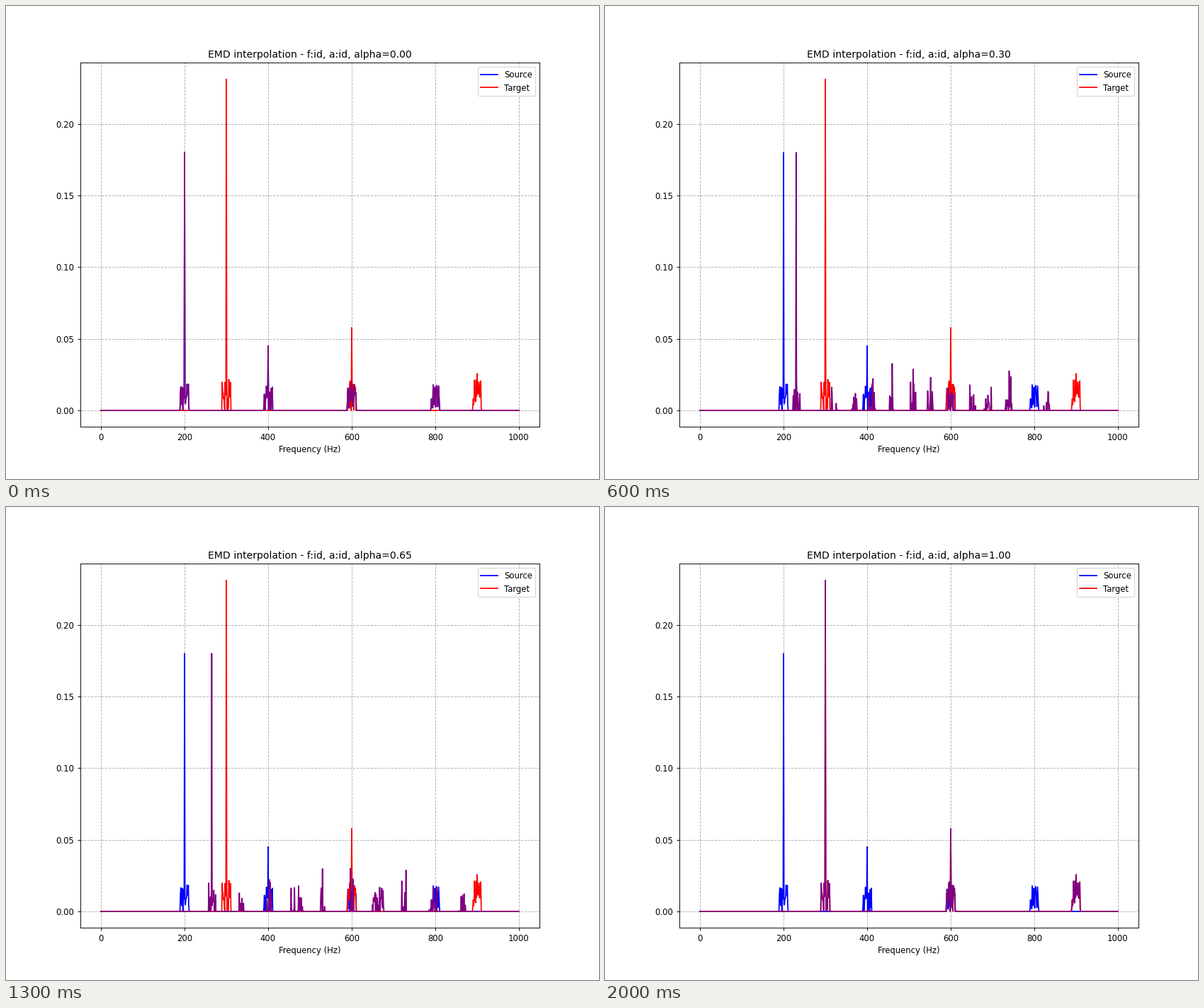
Recreate the animation shown at these times as a matplotlib script. Size 837 px wide and 669 px high, loop 2100 ms.

```python
import numpy as np
import matplotlib.pyplot as plt
from matplotlib.animation import FuncAnimation

WIDTH, HEIGHT = 837, 669
DPI = WIDTH / 10
STEPS = 21
SPREAD = 10
EPS = 1e-12
FREQS = np.arange(1001)

# Strongest moves, settled before the scattered remainder.
MAIN_MOVES = [(200, 300), (600, 300), (400, 907), (400, 600)]


def spectrum(base, top, rng):
    """Harmonics falling off as 1/n^2 over noise, with unit total mass."""
    centers = np.arange(base, FREQS[-1], base)
    amp = np.zeros(len(FREQS))
    for f in centers:
        amp[f - SPREAD:f + SPREAD + 1] = rng.random(2 * SPREAD + 1)
    amp[centers] = 0
    peaks = top * (base / centers) ** 2
    amp *= (1 - peaks.sum()) / amp.sum()
    amp[centers] = peaks
    return amp


def transport(start, end, rng):
    """Split the mass into (from, to, amount) moves."""
    a, b = start.copy(), end.copy()
    moves = []

    def move(i, j):
        m = min(a[i], b[j])
        a[i] -= m
        b[j] -= m
        if m > EPS:
            moves.append((i, j, m))

    for i, j in MAIN_MOVES:
        move(i, j)
    rows = rng.permutation(np.flatnonzero(a > EPS))
    cols = rng.permutation(np.flatnonzero(b > EPS))
    r = c = 0
    while r < len(rows) and c < len(cols):
        move(rows[r], cols[c])
        if a[rows[r]] <= EPS:
            r += 1
        else:
            c += 1
    return [np.array(part) for part in zip(*moves)]


rng = np.random.default_rng(7)
blue = spectrum(200, 0.1801, rng)
red = spectrum(300, 0.2312, rng)
f_from, f_to, mass = transport(blue, red, rng)


def blend(alpha):
    bins = np.rint((1 - alpha) * f_from + alpha * f_to).astype(int)
    return np.bincount(bins, weights=mass, minlength=len(FREQS))


fig, ax = plt.subplots(figsize=((WIDTH + 1e-6) / DPI, (HEIGHT + 1e-6) / DPI),
                       dpi=DPI)
ax.plot(FREQS, blue, color="blue", label="Source")
ax.plot(FREQS, red, color="red", label="Target")
mix, = ax.plot(FREQS, blue, color="purple")
ax.set_xlabel("Frequency (Hz)")
ax.grid(linestyle="--")
ax.legend(loc="upper right")
title = ax.set_title("")


def update(k):
    alpha = k / (STEPS - 1)
    mix.set_ydata(blend(alpha))
    title.set_text(f"EMD interpolation - f:id, a:id, alpha={alpha:.2f}")
    return mix, title


anim = FuncAnimation(fig, update, frames=STEPS, interval=100,
                     repeat=True, repeat_delay=0, blit=False)
plt.show()
```
